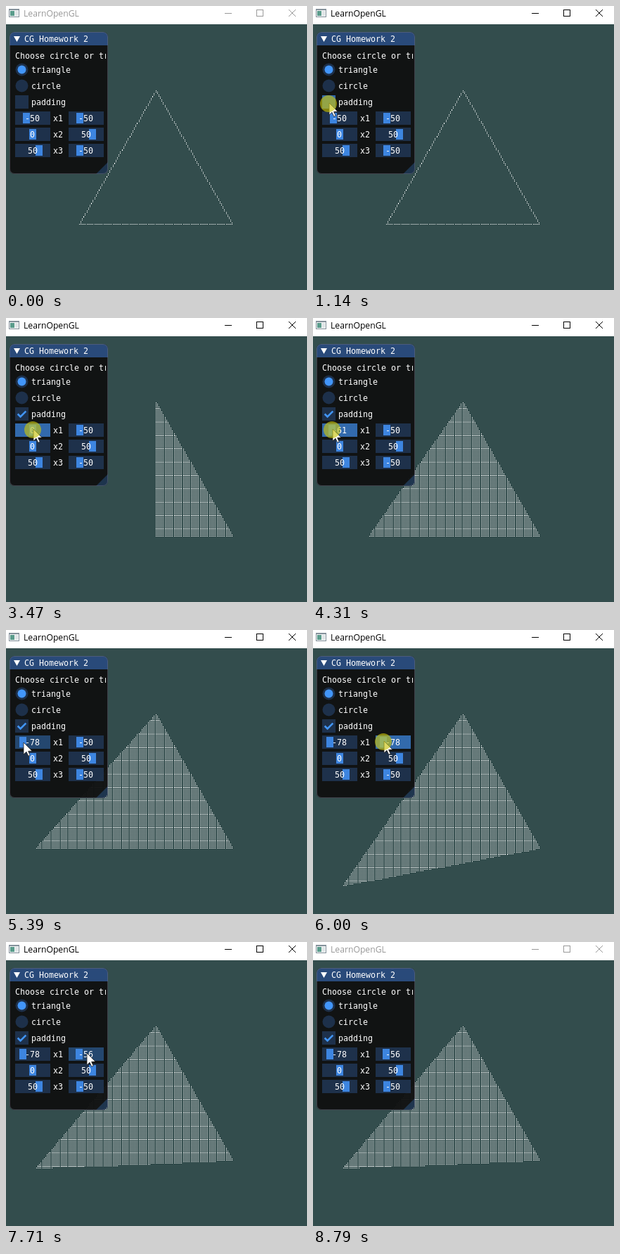
An HTML page with a canvas for the animation above (8.94 s loop, 428 by 404 pixels).

```html
<!DOCTYPE html>
<html lang="en">
<head>
<meta charset="utf-8">
<title>LearnOpenGL</title>
<style>
  html, body { margin: 0; width: 100%; height: 100%; overflow: hidden; background: #334d4d; }
  canvas { display: block; }
</style>
</head>
<body>
<canvas id="stage" width="428" height="404"></canvas>
<script>
const ctx = document.getElementById('stage').getContext('2d');
const LOOP = 8940, TICK = 76.67;
const MONO = '11.63px "DejaVu Sans Mono", monospace';
const FRAME = 'rgba(41,74,122,.54)', HOVER = 'rgba(66,150,250,.4)',
      ACTIVE = 'rgba(66,150,250,.67)', ACCENT = '#4296fa', GRAB = '#3d85e0';

// Pointer moves: start, end, and the point reached; sampled once per TICK
const entry = [395, 410];
const moves = [
  [70, 760, 22, 138],
  [1450, 1600, 33, 116],
  [1770, 1920, 60, 122],
  [2150, 2380, 38, 109],
  [2530, 2760, 38, 150],
  [2990, 3220, 38, 158],
  [3390, 3390, 37, 158],
  [3470, 3620, 40, 158],
  [3850, 4160, 30, 158],
  [4310, 4470, 20, 159],
  [5000, 5080, 24, 160],
  [5460, 6000, 100, 158],
  [6230, 6380, 106, 158],
  [6550, 6700, 109, 158],
  [6930, 6930, 108, 158],
  [7160, 7160, 105, 158],
  [7330, 7330, 104, 158],
  [7710, 7710, 114, 158],
  [7790, 8170, 235, 122],
  [8250, 8480, 366, 385]
];
const presses = [[1140, 1220], [3140, 5390], [6000, 7480]];

const between = (t, a, b) => t >= a && t < b;

function pointerAt(t) {
  const k = moves.findLastIndex(m => m[0] <= t);
  if (k < 0 || t >= 8560) return [-99, -99];
  const [start, end, x, y] = moves[k];
  const [fx, fy] = k ? moves[k - 1].slice(2) : entry;
  const n = Math.round((end - start) / TICK) + 1;
  const u = Math.min(1, Math.floor((t - start + 5) / TICK + 1) / n);
  return [Math.round(fx + (x - fx) * u), Math.round(fy + (y - fy) * u)];
}

const sliderValue = (x, left) =>
  Math.max(-100, Math.min(100, Math.round((x - left - 7) / 36 * 200 - 100)));

function stateAt(t) {
  const [x, y] = pointerAt(t);
  const drag = ([down, up], left, before, after) =>
    t < down ? before : t < up ? sliderValue(x, left) : after;
  return {
    x, y,
    focus: between(t, 1140, 8790),
    down: presses.some(p => between(t, ...p)),
    filled: t >= 1220,
    x1: drag(presses[1], 13, -50, -78),
    y1: drag(presses[2], 89, -50, -56)
  };
}

function text(str, x, y, font = MONO, color = '#fff') {
  ctx.font = font;
  ctx.fillStyle = color;
  ctx.fillText(str, x, y);
}

function rect(x, y, w, h, color) {
  ctx.fillStyle = color;
  ctx.fillRect(x, y, w, h);
}

function disc(x, y, r, color) {
  ctx.fillStyle = color;
  ctx.beginPath();
  ctx.arc(x, y, r, 0, 7);
  ctx.fill();
}

function poly(points, color) {
  ctx.fillStyle = color;
  ctx.beginPath();
  points.forEach(([x, y]) => ctx.lineTo(x, y));
  ctx.closePath();
  ctx.fill();
}

function line(points, color, width) {
  ctx.strokeStyle = color;
  ctx.lineWidth = width;
  ctx.beginPath();
  points.forEach(([x, y]) => ctx.lineTo(x, y));
  ctx.stroke();
}

function dot(i, j) {
  ctx.fillRect(Math.floor(213 + 2.175 * i), Math.floor(215.45 - 1.9 * j), 1, 1);
}

function edge([ax, ay], [bx, by]) {
  const n = Math.max(Math.abs(bx - ax), Math.abs(by - ay));
  for (let k = 0; k <= n; k++)
    dot(Math.round(ax + (bx - ax) * k / n), Math.round(ay + (by - ay) * k / n));
}

function triangle(s) {
  const a = [s.x1, s.y1], b = [0, 50], c = [50, -50];
  const inside = (p, q, x, y) => (q[0] - p[0]) * (y - p[1]) <= (q[1] - p[1]) * (x - p[0]);
  ctx.fillStyle = '#fff';
  edge(a, b);
  edge(b, c);
  edge(c, a);
  if (!s.filled) return;
  for (let j = Math.min(s.y1, -50); j <= 50; j++)
    for (let i = Math.min(s.x1, 0); i <= 50; i++)
      if (inside(a, b, i, j) && inside(b, c, i, j) && inside(c, a, i, j)) dot(i, j);
}

function titleBar(focus) {
  const ink = focus ? '#000' : '#999';
  rect(0, 0, 428, 26, '#fff');
  rect(4, 4, 15, 12, '#84919a');
  rect(5, 6, 13, 9, '#f0f3f4');
  rect(6, 7, 6, 7, '#5a9c8c');
  rect(13, 7, 4, 7, '#dfe4e6');
  text('LearnOpenGL', 25, 15, '12.2px "Open Sans", sans-serif', ink);
  rect(311, 10, 10, 1, ink);
  ctx.strokeStyle = ink;
  ctx.lineWidth = 1;
  ctx.strokeRect(356.5, 5.5, 9, 9);
  line([[402, 5], [412, 15]], ink, 1);
  line([[412, 5], [402, 15]], ink, 1);
}

function panel(s) {
  const tint = (x, y, w, h) => {
    const over = s.focus && between(s.x, x, x + w) && between(s.y, y, y + h);
    return over ? (s.down ? ACTIVE : HOVER) : FRAME;
  };
  const slider = (x, y, v) => {
    const color = tint(x, y, 50, 19);
    rect(x, y, 50, 19, color);
    rect(Math.round(x + 2 + 36 * (v + 100) / 200), y + 2, 10, 15, color === ACTIVE ? ACCENT : GRAB);
    text(String(v), Math.floor(x + 25 - String(v).length * 3.5), y + 14);
  };

  ctx.save();
  ctx.beginPath();
  ctx.roundRect(5, 37, 140, 202, 7);
  ctx.fillStyle = 'rgba(15,15,15,.94)';
  ctx.fill();
  ctx.clip();
  rect(5, 37, 140, 19, '#294a7a');
  poly([[145, 222], [145, 239], [128, 239]], 'rgba(66,150,250,.25)');
  ctx.restore();
  ctx.strokeStyle = 'rgba(110,110,128,.5)';
  ctx.lineWidth = 1;
  ctx.beginPath();
  ctx.roundRect(5.5, 37.5, 139, 201, 6.5);
  ctx.stroke();
  poly([[11, 43], [20, 43], [15.5, 51]], '#fff');
  text('CG Homework 2', 26, 51);

  ctx.save();
  ctx.beginPath();
  ctx.rect(6, 56, 136, 182);
  ctx.clip();
  text('Choose circle or triangle', 13, 75);
  disc(22.5, 90.5, 9, tint(13, 81, 79, 19));
  disc(22.5, 90.5, 6, ACCENT);
  text('triangle', 36, 95);
  disc(22.5, 113.5, 9, tint(13, 104, 65, 18));
  text('circle', 36, 118);
  rect(13, 127, 19, 19, tint(13, 127, 72, 19));
  if (s.filled) line([[16.65, 136.5], [20.55, 140.4], [28.35, 132.6]], ACCENT, 2.6);
  text('padding', 36, 141);
  [[s.x1, s.y1], [0, 50], [50, -50]].forEach(([x, y], i) => {
    const top = 150 + 23 * i;
    slider(13, top, x);
    text('x' + (i + 1), 67, top + 14);
    slider(89, top, y);
  });
  ctx.restore();
}

function cursor(s) {
  ctx.save();
  ctx.translate(s.x + 1, s.y);
  const arrow = [[0, 0], [0, 17], [4, 13.3], [6.8, 19.3], [9.2, 18.2], [6.6, 12.4], [12, 12]];
  poly(arrow, '#fff');
  line([...arrow, arrow[0]], '#222', .8);
  ctx.restore();
  if (s.down) disc(s.x, s.y + 1, 12, 'rgba(200,195,15,.65)');
}

function draw(t) {
  const s = stateAt(t);
  rect(0, 0, 428, 404, '#334d4d');
  triangle(s);
  panel(s);
  cursor(s);
  titleBar(s.focus);
}

const start = performance.now();
function tick() {
  draw((performance.now() - start) % LOOP);
  requestAnimationFrame(tick);
}
tick();
</script>
</body>
</html>
```
